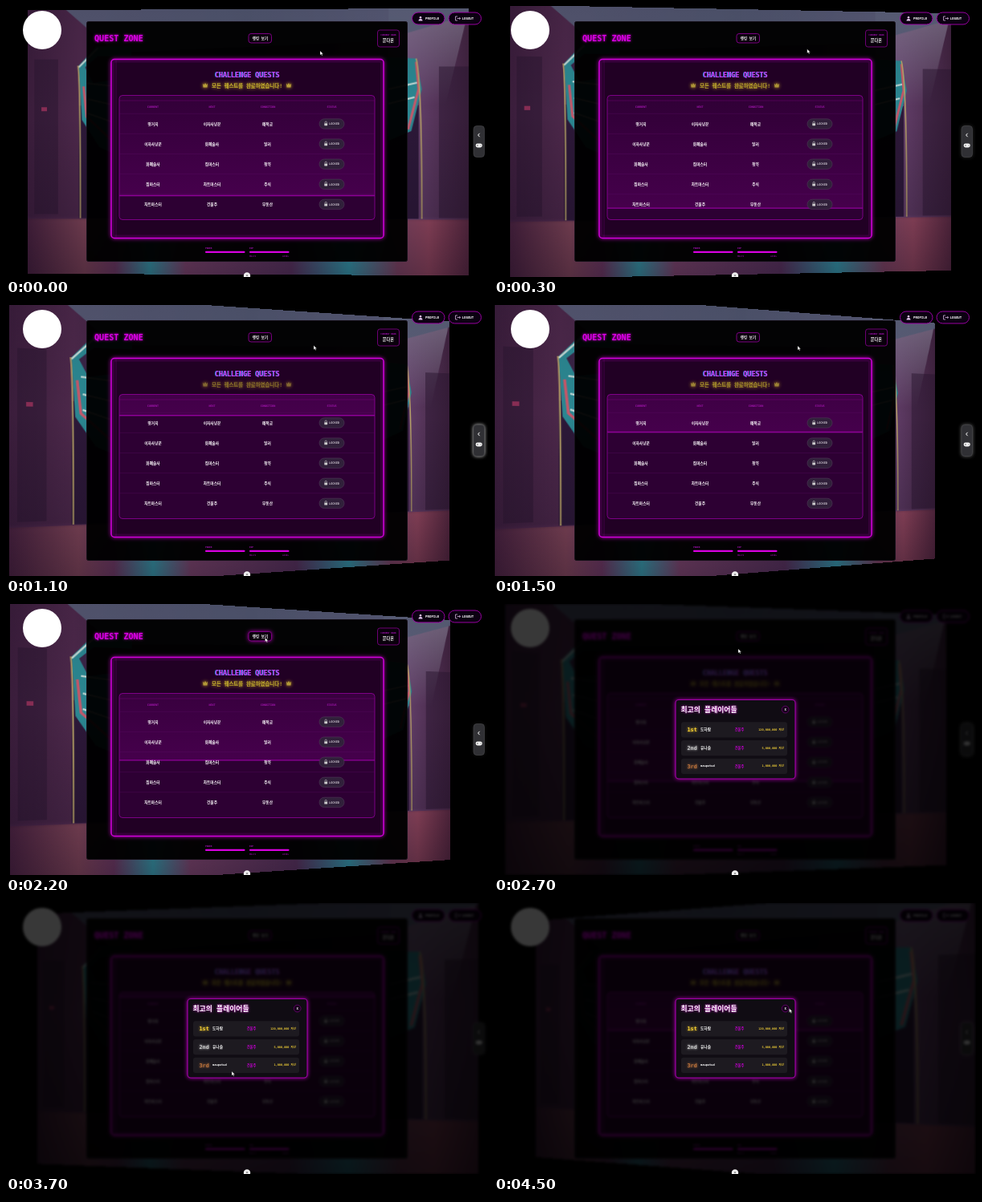
Animation, 600 px wide and 338 px high, one loop 4.6 s. Source, as an HTML page:

```html
<!DOCTYPE html>
<html lang="ko">
<head>
<meta charset="utf-8">
<style>
html, body { margin: 0; width: 100%; height: 100%; overflow: hidden; background: #000; }
#stage { position: relative; width: 600px; height: 338px; overflow: hidden; background: #000; }
#stage > *, #scene > svg { position: absolute; left: 0; top: 0; }
#scene { width: 600px; height: 338px; background: #000; overflow: hidden; }
#scene > #room { left: 25.5px; top: 3.5px; }
text { font-family: "DejaVu Sans Mono", "Noto Sans CJK KR", "Noto Sans CJK", monospace; font-weight: 900; dominant-baseline: central; }
.glow { filter: drop-shadow(0 0 1.5px #d0d); }
.big { filter: drop-shadow(0 0 2.5px #a0a); }
.gold { filter: drop-shadow(0 0 2px #db2); }
</style>
</head>
<body>
<div id="stage">
  <div id="scene">
    <svg id="room" width="549" height="331">
      <defs>
        <linearGradient id="wall">
          <stop offset="0" stop-color="#3a1d3b"/><stop offset=".12" stop-color="#4c284a"/>
          <stop offset=".5" stop-color="#2a1e38"/><stop offset=".87" stop-color="#64406c"/>
          <stop offset="1" stop-color="#40233f"/>
        </linearGradient>
        <linearGradient id="floor">
          <stop offset="0" stop-color="#3c1c36"/><stop offset=".13" stop-color="#6b3a4c"/>
          <stop offset=".2" stop-color="#5a2f52"/><stop offset=".28" stop-color="#2d7d8b"/>
          <stop offset=".36" stop-color="#683a5c"/><stop offset=".6" stop-color="#4b2b50"/>
          <stop offset=".73" stop-color="#2c8292"/><stop offset=".84" stop-color="#6b3a55"/>
          <stop offset=".91" stop-color="#7c3c52"/><stop offset="1" stop-color="#4a2238"/>
        </linearGradient>
        <linearGradient id="shade" x2="0" y2="1">
          <stop offset="0" stop-color="#100818" stop-opacity=".1"/>
          <stop offset=".4" stop-color="#100818" stop-opacity="0"/>
          <stop offset=".78" stop-color="#100818" stop-opacity=".2"/>
          <stop offset=".8" stop-color="#100818" stop-opacity="0"/>
          <stop offset="1" stop-color="#100818" stop-opacity=".25"/>
        </linearGradient>
        <linearGradient id="haze" x2="0" y2="1">
          <stop offset="0" stop-color="#8a8298" stop-opacity=".75"/>
          <stop offset="1" stop-color="#8a8298" stop-opacity="0"/>
        </linearGradient>
      </defs>
      <path fill="url(#wall)" d="M0 0H549V262H0z"/>
      <path fill="url(#floor)" d="M0 262H549V331H0z"/>
      <path fill="url(#haze)" d="M450 0H549L520 120H450z"/>
      <path fill="#57617a" opacity=".85" d="M48 0H549V8L440 40 110 54z"/>
      <path fill="#2b1630" opacity=".5" d="M8 62H38V256H8zM512 72H549V260H512z"/>
      <path fill="#c03a68" opacity=".6" d="M17 122h7v5h-7z"/>
      <path fill="#2c1838" d="M64 120H130V261H64zM430 120H487V261H430z"/>
      <path fill="#2b8791" d="M64 70L86 46 130 46V190L90 172 68 138zM440 60L484 62 491 100 478 152 450 164z"/>
      <path fill="#3a2446" d="M72 72L88 58H130V84L82 92z"/>
      <path fill="none" stroke="#c4586a" stroke-width="3" d="M70 96L74 134 110 168M484 66L487 100 474 150"/>
      <path fill="none" stroke="#c9dcd8" stroke-width="2" d="M64 72L88 48M74 92L110 96M76 112L110 120M76 130L110 142M450 100L485 92M450 118L482 110"/>
      <path fill="none" stroke="#b9a468" stroke-width="1.6" d="M63 70Q66 90 66 261M484 62Q491 90 491 261"/>
      <path fill="url(#shade)" d="M0 0H549V331H0z"/>
    </svg>
    <svg id="ui" width="600" height="338"></svg>
  </div>
  <svg id="top" width="600" height="338">
    <g id="modal"></g>
    <circle cx="300" cy="336.5" r="4.2" fill="#eee"/>
    <path d="M298.8 335.5h2.4l-1.2 2z" fill="#555"/>
    <path id="cursor" d="M0 0V5.2L1.3 4.1 2.2 6 3.1 5.6 2.2 3.8H3.8z" fill="#fff" stroke="#222" stroke-width=".3"/>
  </svg>
</div>
<script>
const $ = id => document.getElementById(id);
const text = (x, y, s, size, fill = '#fff', anchor = 'middle', extra = '') =>
  `<text x="${x}" y="${y}" font-size="${size}" fill="${fill}" text-anchor="${anchor}" ${extra}>${s}</text>`;
const box = (x, y, w, h, r, fill, stroke = 'none', sw = 1, extra = '') =>
  `<rect x="${x}" y="${y}" width="${w}" height="${h}" rx="${r}" fill="${fill}" stroke="${stroke}" stroke-width="${sw}" ${extra}/>`;
const line = (d, stroke, sw = 1, extra = '') =>
  `<path d="${d}" fill="none" stroke="${stroke}" stroke-width="${sw}" ${extra}/>`;
const crown = x => `<path d="M${x - 3} 96.5l1.5 2 1.5-2.5 1.5 2.5 1.5-2-.5 5h-5z" fill="#b9a03a"/>`;

const columns = [183, 256.5, 325.5];
const ranks = ['땅거지', '이자사냥꾼', '화폐술사', '집마스터', '차트마스터', '건물주'];
const goals = ['예적금', '달러', '청약', '주식', '부동산'];

const lockPill = y =>
  box(390, y - 6.2, 31, 12.4, 6.2, '#30203a', '#4d3455', .7) +
  box(396.3, y - .8, 3.8, 3, .4, '#ccc') +
  line(`M397 ${y - .8}v-1a1.2 1.2 0 0 1 2.4 0v1`, '#ccc', .6) +
  text(402, y + .2, 'LOCKED', 3.6, '#c5bdc8', 'start');

const row = (goal, i) => {
  const y = 147 + i * 25.1;
  return line(`M141 ${y - 12.7}H459`, '#60106a', .5, 'opacity=".6"') +
    [ranks[i], ranks[i + 1], goal].map((s, c) => text(columns[c], y, s, 4.7)).join('') + lockPill(y);
};

const navButton = (x, label) =>
  box(x, 8, 40.5, 15, 7.5, '#0c0012', '#a800b0', .9) +
  text(x + 16.5, 15.7, label, 4.1, '#fff', 'start');

$('ui').innerHTML =
  `<defs><clipPath id="table">${box(141, 111.5, 318, 155, 4)}</clipPath>
  <linearGradient id="tail" x2="0" y2="1"><stop stop-color="#d000d8" stop-opacity="0"/>
  <stop offset="1" stop-color="#d000d8" stop-opacity=".15"/></linearGradient></defs>` +
  `<circle cx="45" cy="30" r="24" fill="#fff"/>` +
  navButton(505.5, 'PROFILE') + navButton(551, 'LOGOUT') +
  `<circle cx="516" cy="14.3" r="1.3" fill="#e5c8f0"/><path d="M513.5 18.5a2.5 2.5 0 0 1 5 0z" fill="#e5c8f0"/>` +
  line('M562 13h-2.5v5h2.5M561.5 15.5h4m-1.3-1.5l1.5 1.5-1.5 1.5', '#e5c8f0', .7) +
  box(100.5, 19.5, 399, 299, 2, '#000', '#17111a', 1, 'fill-opacity=".96"') +
  text(110, 40.5, 'QUEST ZONE', 10.1, '#d800e4', 'start', 'class="glow"') +
  box(302, 34.5, 28.5, 11.5, 3, '#0b000d', '#86008e', .9, 'id="rankButton"') +
  text(316.5, 40.2, '랭킹 보기', 4.5) +
  box(462.5, 30, 27, 21, 3, '#0a000c', '#86008e', .8) +
  text(476, 36, 'CURRENT RANK', 2.7, '#a010b0') + text(476, 43, '문다온', 5.2) +
  box(131, 66.5, 339, 223, 4, '#210024', '#d000da', 1.5, 'class="big"') +
  box(133, 68.5, 335, 219, 3, 'none', '#d000d8', 4, 'opacity=".12"') +
  line('M137 67V289', '#80008a', .5, 'opacity=".7"') +
  text(299.7, 85.8, 'CHALLENGE QUESTS', 8.4, '#2fa4ff', 'middle', 'opacity=".85"') +
  text(300.5, 85.5, 'CHALLENGE QUESTS', 8.4, '#c63df0') +
  `<g id="notice" class="gold">` + crown(248) + crown(352) +
  text(300, 99.5, '모든 퀘스트를 완료하였습니다!', 6.4, '#c9b52e') + `</g>` +
  box(141, 111.5, 318, 155, 4, '#2d0033', '#85008f', .9) +
  line('M141 118H459', '#68006f', .5) +
  `<g clip-path="url(#table)"><g id="scan">` + box(141, -156, 318, 156, 0, 'url(#tail)') +
  line('M141 0H459', '#8e0098', 1.4) + `</g></g>` +
  [[183, 'CURRENT'], [256.5, 'NEXT'], [326, 'CONDITION'], [405.5, 'STATUS']]
    .map(([x, s]) => text(x, 126, s, 3.4, '#a515b2')).join('') +
  goals.map(row).join('') +
  [248, 303].map(x => box(x, 305.8, 49.5, 2.2, 1, '#d800e0')).join('') +
  text(248, 301.8, 'POWER', 2.8, '#a010b0', 'start') + text(303, 301.8, 'EXP', 2.8, '#a010b0', 'start') +
  text(303, 311.8, 'MULTI', 2.7, '#850e92', 'start') + text(352, 311.8, 'LEVEL', 2.7, '#850e92', 'end') +
  box(582, 149.5, 13.5, 39, 4, '#303034', '#4a4a4e', .6, 'id="tab"') +
  line('M589.6 158.8l-2 2.2 2 2.2', '#fff', 1) +
  box(584.6, 171.4, 8.2, 5, 2.4, '#f2f2f2') +
  line('M586 174h2M587 173v2M590 174h1.6', '#555', .5);

const players = [
  ['1st', '도하람', '120,000,000', '#f5cf32'],
  ['2nd', '유나솔', '5,000,000', '#c8c8c8'],
  ['3rd', 'mzwpxtud', '1,000,000', '#b8713c']
];
$('modal').innerHTML =
  box(226, 119.5, 149, 98.5, 4, '#100c13', '#a000a8', 1.1, 'class="big"') +
  text(232.5, 131.7, '최고의 플레이어들', 8.8, '#fff', 'start', 'class="glow"') +
  `<circle cx="362.7" cy="131.6" r="4.4" fill="#16001a" stroke="#7a0083" stroke-width=".7"/>` +
  text(362.7, 131.6, 'X', 4) +
  players.map(([place, name, sum, color], i) => {
    const y = 157 + i * 22.8;
    return box(233, y - 9.8, 132, 19.2, 3, '#1d1a20') +
      text(240.5, y, place, 6.8, color, 'start', `style="filter:drop-shadow(0 0 1.5px ${color})"`) +
      text(257, y - .2, name, i < 2 ? 4.7 : 3.7, '#fff', 'start') +
      text(305.5, y - .2, '건물주', 4.2, '#c000cc') +
      text(361, y - .2, sum + ' 자산', 3.5, '#eac936', 'end');
  }).join('');

// Pointer stops: time in ms, x, y
const path = [[0, 391, 56], [700, 388, 50], [1500, 378, 51], [2100, 323, 42], [2300, 322, 42],
  [2700, 304, 56], [3000, 296, 90], [3700, 281, 210], [4400, 366, 133], [4600, 369, 130]];
const clamp = v => Math.max(0, Math.min(1, v));
const mix = (a, b, k) => a + (b - a) * k;
const ease = k => k * k * (3 - 2 * k);

function pointer(ms) {
  const i = path.findIndex((p, n) => n && ms <= p[0]);
  const a = path[i - 1], b = path[i], k = ease((ms - a[0]) / (b[0] - a[0]));
  return [mix(a[1], b[1], k), mix(a[2], b[2], k)];
}

function draw(now) {
  const ms = Math.floor(now % 4600 / 100) * 100, s = ms / 1000;
  const sway = Math.sin(s - .05), pulse = Math.cos(Math.PI * s), open = clamp((ms - 2300) / 300);
  $('room').style.transform = `translateX(${9 * sway}px) perspective(412px) rotateY(${11 * sway}deg)`;
  $('scan').setAttribute('transform', `translate(0 ${111 + (125.5 + 52 * s) % 156})`);
  $('notice').setAttribute('opacity', .82 + .18 * pulse);
  $('tab').style.filter = `drop-shadow(0 0 2px rgba(255,255,255,${.4 - .4 * pulse}))`;
  $('rankButton').setAttribute('class', ms >= 2000 && ms < 2500 ? 'big' : '');
  $('scene').style.filter = open ? `blur(${1.5 * open}px) brightness(${mix(1, .22, open)})` : 'none';
  $('modal').setAttribute('opacity', open);
  $('cursor').setAttribute('transform', `translate(${pointer(ms)})`);
  requestAnimationFrame(() => draw(performance.now() - start));
}
const start = performance.now();
draw(0);
</script>
</body>
</html>
```
